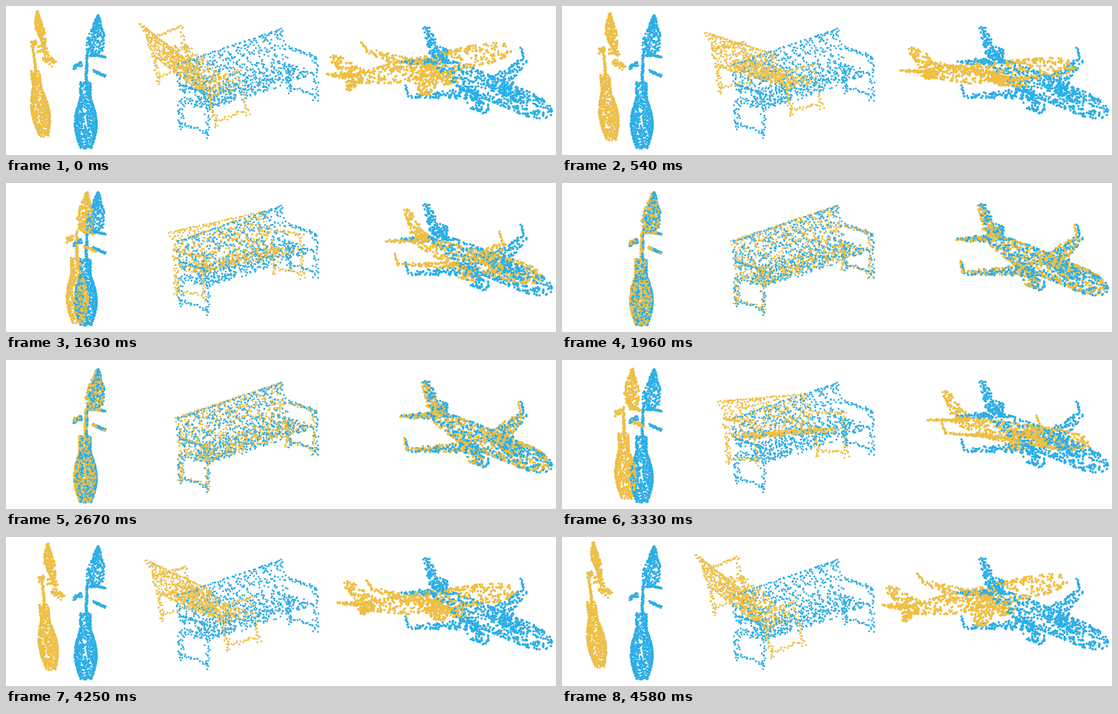
Animation, 1019 px wide and 278 px high, one loop 5.25 s. Source, as a matplotlib script:

```python
import numpy as np
import matplotlib.pyplot as plt
from matplotlib.animation import FuncAnimation

W, H, DPI = 1019, 278, 64
STEP, FRAMES = 25, 210
TICK = 1000 / 24
YELLOW, BLUE = "#fdba16", "#14adf0"
YELLOW_RIM, BLUE_RIM = "#d6cb9c", "#5fb4d8"

rng = np.random.default_rng(11)


def spread(n):
    """Evenly spaced but shuffled values in 0..1."""
    return rng.permutation((np.arange(n) + rng.random(n)) / n)


def by_weight(n, fn):
    """Values in 0..1 with density proportional to fn."""
    x = np.linspace(0, 1, 400)
    c = np.cumsum(fn(x))
    return np.interp(spread(n), c / c[-1], x)


def jitter(n, size):
    return rng.uniform(-1, 1, (n, 3)) * size


def line(n, a, b, noise):
    a, b = np.array(a), np.array(b)
    return a + spread(n)[:, None] * (b - a) + jitter(n, noise)


def blade(n, root, tip, chords, noise):
    """Tapered surface whose chord runs along the first axis."""
    root, tip = np.array(root), np.array(tip)
    c0, c1 = chords
    t = by_weight(n, lambda v: c0 + (c1 - c0) * v)
    pts = root + t[:, None] * (tip - root) + jitter(n, noise)
    pts[:, 0] += spread(n) * (c0 + (c1 - c0) * t)
    return pts


# --- clouds, each in its own three axes --------------------------------------

def vase_radius(t):
    return 10 + 10.5 * np.sin(np.pi * np.clip((t - .25) / .75, 0, 1))


def vase():
    t = by_weight(650, vase_radius)
    r, ang = vase_radius(t), rng.uniform(0, 2 * np.pi, t.size)
    body = np.c_[r * np.sin(ang), 124 * t, r * np.cos(ang)]

    v = spread(240)
    half = 2 + 15 * np.sin(.8 * np.pi * v ** 1.2)
    side = rng.uniform(-1, 1, v.size)
    bloom = np.c_[25 - 8 * v + half * side, 77 * v - 125, 28 * v * (1 - side)]

    return np.vstack([
        body, bloom,
        line(48, (1, 4, 0), (4, -52, 0), (2, 1, 2)),
        line(30, (-20, -28, 60), (-7, -34, 60), (2, 5, 3)),
        line(38, (15, -21, 32), (38, -11, 32), (1, 2, 16)),
        line(24, (14, -51, 0), (38, -47, 0), (1, 1.5, 16)),
    ])


def bench():
    back = blade(370, (0, 0, 0), (0, -.15, 64), (1, 1), (0, .02, 1))
    rail = line(45, (0, -.15, 64), (1, -.15, 64), (0, .02, 1))
    seat = blade(400, (0, 0, 0), (0, 1, 0), (1, 1), (0, .02, 4))
    parts = [back, rail, seat]
    for u in (0, 1):
        parts.append(line(28, (u, 0, 31), (u, 1.1, 31), (.012, 0, 2)))
        parts.append(line(18, (u, 0, -42), (u, 1, -42), (.012, 0, 3)))
        for w in (0, 1):
            parts.append(line(28, (u, w, 31 * w), (u, w, -54), (.02, .06, 0)))
    return np.vstack(parts) - (.5, .5, 0)


def hull_radius(a):
    tail = np.clip((a + .06) / .36, 0, 1) ** .75
    nose = np.sqrt(np.clip(1 - (np.clip(a - .8, 0, 1) / .205) ** 2, 0, 1))
    return 19.5 * tail * nose


def plane():
    a = by_weight(470, hull_radius)
    r, ang = hull_radius(a), rng.uniform(0, 2 * np.pi, a.size)
    lift = 9 * np.clip(1 - a / .3, 0, 1)
    parts = [
        np.c_[a, r * np.sin(ang) / 112, r * np.cos(ang) + lift],
        blade(90, (0, 0, 14), (-.06, 0, 64), (.15, .06), (0, .015, 0)),
    ]
    for b in (-1, 1):
        ang = rng.uniform(0, 2 * np.pi, 55)
        parts += [
            blade(120, (.37, b * .12, -9), (.28, b, 0), (.21, .05), (0, 0, 1.5)),
            line(8, (.3, b, 0), (.28, b, 20), (.005, .01, 1)),
            blade(52, (0, b * .03, 9), (-.06, b * .37, 9), (.12, .04), (0, 0, 1.5)),
            np.c_[.55 + jitter(55, .06)[:, 0],
                  b * .3 + .07 * np.sin(ang), 9 * np.cos(ang) - 18],
        ]
    return np.vstack(parts) - (.5, 0, 0)


# Each pose: screen place of the anchor, then of the three axes.
# bow bends the anchor's path; size is the dot diameter in pixels.
MODELS = [
    dict(make=vase, size=3.7, bow=(0, 2),
         apart=[(54, 124), (.8, .17), (.13, .95), (.2, -.38)],
         joined=[(147, 142), (1, 0), (.01, 1), (0, 0)]),
    dict(make=bench, size=3.1, bow=(-1, -5),
         apart=[(354, 122), (107, 83), (58, -22), (-.25, -.98)],
         joined=[(448, 151), (200, -69), (50, 17), (-.03, -1)]),
    dict(make=plane, size=4.0, bow=(-7, -1),
         apart=[(783, 112), (303, -68), (53, 43), (-.28, -.86)],
         joined=[(896, 153), (222, 95), (107, -35), (0, -1)]),
]


def project(pts, model, p):
    """Place a cloud on screen for progress p (0 apart, 1 joined)."""
    pose = (1 - p) * np.array(model["apart"]) + p * np.array(model["joined"])
    bend = 4 * p * (1 - p) * np.array(model["bow"])
    return pose[0] + bend + pts @ pose[1:]


moving = [(m["make"](), m) for m in MODELS]
fixed = np.vstack([project(m["make"](), m, 1) for m in MODELS])
sizes = np.concatenate([np.full(len(pts), m["size"]) for pts, m in moving])


def scene(p):
    return np.vstack([project(pts, m, p) for pts, m in moving] + [fixed])[order]


def progress(i):
    k = int((i * STEP + 20) / TICK)
    if k <= 48:
        return k / 48
    if k < 64:
        return 1.0
    return max(0.0, (110 - k) / 47)


fig = plt.figure(figsize=(W / DPI, H / DPI), dpi=DPI, facecolor="white")
ax = fig.add_axes([0, 0, 1, 1])
ax.set_xlim(0, W)
ax.set_ylim(H, 0)
ax.axis("off")

order = rng.permutation(2 * len(fixed))
is_moving = order < len(fixed)
dots = ax.scatter(
    *scene(0).T, s=(np.tile(sizes, 2)[order] * 72 / DPI) ** 2, linewidths=.5,
    c=np.where(is_moving, YELLOW, BLUE),
    edgecolors=np.where(is_moving, YELLOW_RIM, BLUE_RIM))


def draw(i):
    dots.set_offsets(scene(progress(i)))
    return dots,


anim = FuncAnimation(fig, draw, frames=FRAMES, interval=STEP,
                     init_func=lambda: draw(0), repeat=True, repeat_delay=0)
plt.show()
```
